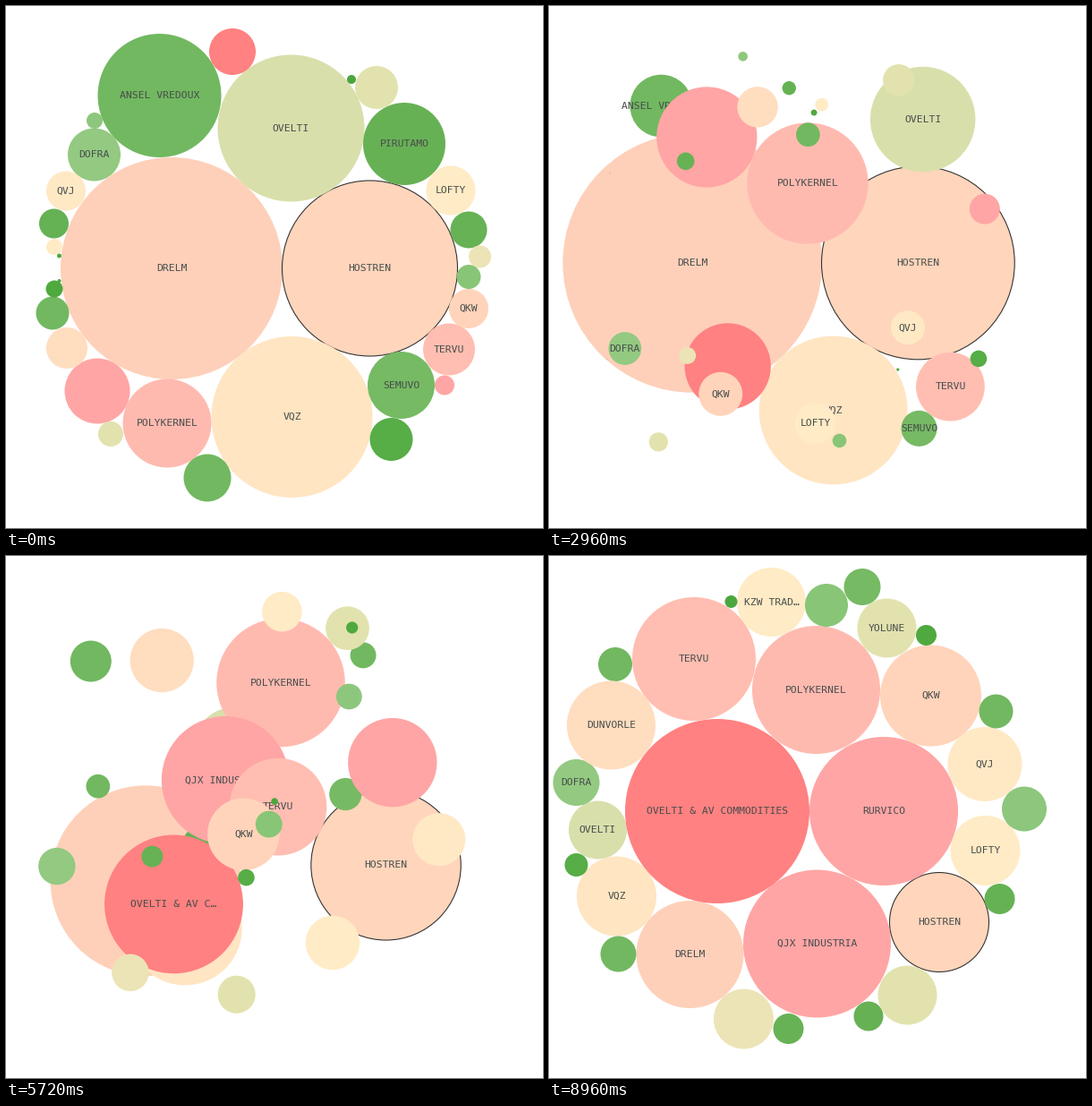
A matplotlib script for the animation above (9 s loop, 600x583 px).

```python
import matplotlib.pyplot as plt
from matplotlib.animation import FuncAnimation
from matplotlib.patches import Circle

W, H, DPI = 600, 583, 64
FRAMES, STEP = 225, 40
PT = 72 / DPI            # points per pixel
CHAR = 6.86              # label advance per character, px
MOVE = 1500              # length of one rearrangement, ms
STARTS = (2006, 4978)

# Bubbles from back to front: fill and name
NODES = [
    ("#fed0b9", "DRELM"), ("#ffd5bb", "HOSTREN"), ("#ffe5c2", "VQZ"),
    ("#d9dfab", "OVELTI"), ("#71b860", "ANSEL VREDOUX"),
    ("#67b155", "PIRUTAMO"), ("#76ba64", "SEMUVO"),
    ("#ffbab0", "POLYKERNEL"), ("#ffa5a5", "QJX INDUSTRIA"),
    ("#ff8181", "OVELTI & AV COMMODITIES"), ("#ffbeb1", "TERVU"),
    ("#65b254", ""), ("#ffa5a5", "RURVICO"), ("#93c981", "DOFRA"),
    ("#ffd4ba", "QKW"), ("#ffddbf", "DUNVORLE"), ("#ffebc5", "LOFTY"),
    ("#57ad46", ""), ("#ffe9c5", "QVJ"), ("#72b860", ""), ("#72b861", ""),
    ("#e2e2ae", "YOLUNE"), ("#4fa93e", ""), ("#4fa93e", ""),
    ("#ffebc5", "KZW TRADING"), ("#67b255", ""), ("#e2e2ae", ""),
    ("#ece4b6", ""), ("#88c576", ""), ("#8dc77d", ""), ("#4ca63f", ""),
    ("#4fa93e", ""),
]
OUTLINED = 1

# Layouts as (x, y, radius), in the order of NODES
FIRST = [
    (185, 293, 124), (406.5, 293, 98), (319.5, 459, 90), (318.5, 136.5, 82),
    (171.5, 100, 69), (445, 154, 46), (441.5, 423.5, 37.5), (180, 466, 49.5),
    (102, 430, 36.5), (253, 51, 26), (495, 383.5, 29), (53.5, 243, 16.5),
    (490, 423.5, 11), (98.5, 166, 29.5), (517, 338, 22), (68, 382, 23),
    (497, 206, 27.5), (430.5, 484, 24), (67, 206.5, 22), (225, 527, 26.5),
    (52, 343, 18.5), (414, 91, 24), (59.5, 307, 2), (54, 316, 9.5),
    (54, 269, 9), (517, 250, 20.5), (117, 478, 14), (529.5, 280, 12.5),
    (517, 302.5, 13.5), (99, 128, 9), (386, 82, 5), (59.5, 279, 2.5),
]
SECOND = [
    (154.4, 285.4, 149.9), (413.8, 285.5, 110.2), (317.2, 449.7, 81.2),
    (441.4, 124.2, 53.2), (114.3, 114.3, 26.7), (79.1, 138, 15.5),
    (406.8, 483.4, 15.8), (315, 134, 72), (194.1, 78.7, 60.8),
    (187, 486.4, 53.4), (437.3, 435.2, 40.6), (319.6, 55.5, 5.6),
    (486.1, 179.6, 18.4), (81.6, 434.3, 15.7), (114, 456.1, 25),
    (272.5, 48.5, 22.6), (249.9, 528.4, 22), (491.8, 372.4, 5.8),
    (480.8, 395.7, 18.3), (304.8, 52.1, 10.2), (126.6, 81.4, 7.1),
    (385.3, 80.8, 16.2), (66, 415, 0), (354, 72, 2), (364.7, 72.2, 7),
    (65.6, 155, 7.2), (123.6, 489, 9.8), (65.1, 416.8, 8.7),
    (278.5, 529.2, 6.4), (244.8, 39.2, 4.4), (390.7, 483.5, 0.8),
    (70, 165, 0),
]
THIRD = [
    (157.5, 445, 60), (436, 409, 55.5), (75.5, 380, 44.5), (54.5, 306, 32.5),
    (74, 121, 19), (357, 514, 16.5), (350, 34.5, 20.5), (298.5, 149.5, 71.5),
    (299.5, 433, 82.5), (188, 285, 103), (162, 115, 69), (503.5, 383, 17),
    (374, 285, 83), (30.5, 253, 26), (426.5, 156, 56.5), (69.5, 189, 49.5),
    (487.5, 329, 39), (30.5, 345, 13), (487, 232.5, 41.5), (499.5, 173.5, 19),
    (77.5, 444.5, 20), (377.5, 80.5, 33), (66, 415, 0), (421.5, 88.5, 11.5),
    (248.5, 51.5, 38.5), (267.5, 528, 17), (400.5, 490.5, 33),
    (217.5, 517, 33.5), (310, 55, 24), (531, 282.5, 25), (203.5, 51, 7),
    (70, 165, 0),
]
LAYOUTS = (FIRST, SECOND, THIRD)


def cubic_in_out(t):
    t = min(max(t, 0), 1)
    return 4 * t ** 3 if t < 0.5 else 1 - 4 * (1 - t) ** 3


def fit(name, r):
    """Shorten or drop a name that does not fit its bubble."""
    room = int((2 * r - 10.2) / CHAR)
    if r > 20 and len(name) <= room:
        return name
    return name[:room - 1] + "…" if name and r > 38 else ""


LABELS = [[fit(name, spot[2]) for (_, name), spot in zip(NODES, layout)]
          for layout in LAYOUTS]

fig = plt.figure(figsize=(W / DPI, H / DPI), dpi=DPI, facecolor="white")
ax = fig.add_axes([0, 0, 1, 1])
ax.set_xlim(0, W)
ax.set_ylim(H, 0)
ax.axis("off")

bubbles, texts = [], []
for i, (fill, _) in enumerate(NODES):
    edge = "#333333" if i == OUTLINED else "none"
    bubbles.append(ax.add_patch(
        Circle((0, 0), 1, fc=fill, ec=edge, lw=1.1 * PT, zorder=i + 1)))
    texts.append(ax.text(
        0, 0, "", ha="center", va="baseline", color="#484c4c",
        family="DejaVu Sans Mono", size=CHAR / 0.602 * PT, zorder=i + 1.5))


def draw(frame):
    now = frame * STEP
    leg = 0 if now < STARTS[1] else 1
    k = cubic_in_out((now - STARTS[leg]) / MOVE)
    shown = LABELS[sum(now >= s + MOVE for s in STARTS)]
    pairs = zip(LAYOUTS[leg], LAYOUTS[leg + 1])
    for bubble, text, label, (a, b) in zip(bubbles, texts, shown, pairs):
        x, y, r = (p + k * (q - p) for p, q in zip(a, b))
        bubble.center = x, y
        bubble.radius = r
        bubble.set_visible(r > 0.1)
        text.set_position((x, y + 3.2))
        text.set_text(label)
    return bubbles + texts


anim = FuncAnimation(fig, draw, frames=FRAMES, interval=STEP,
                     repeat=True, repeat_delay=0, blit=False)
plt.show()
```
